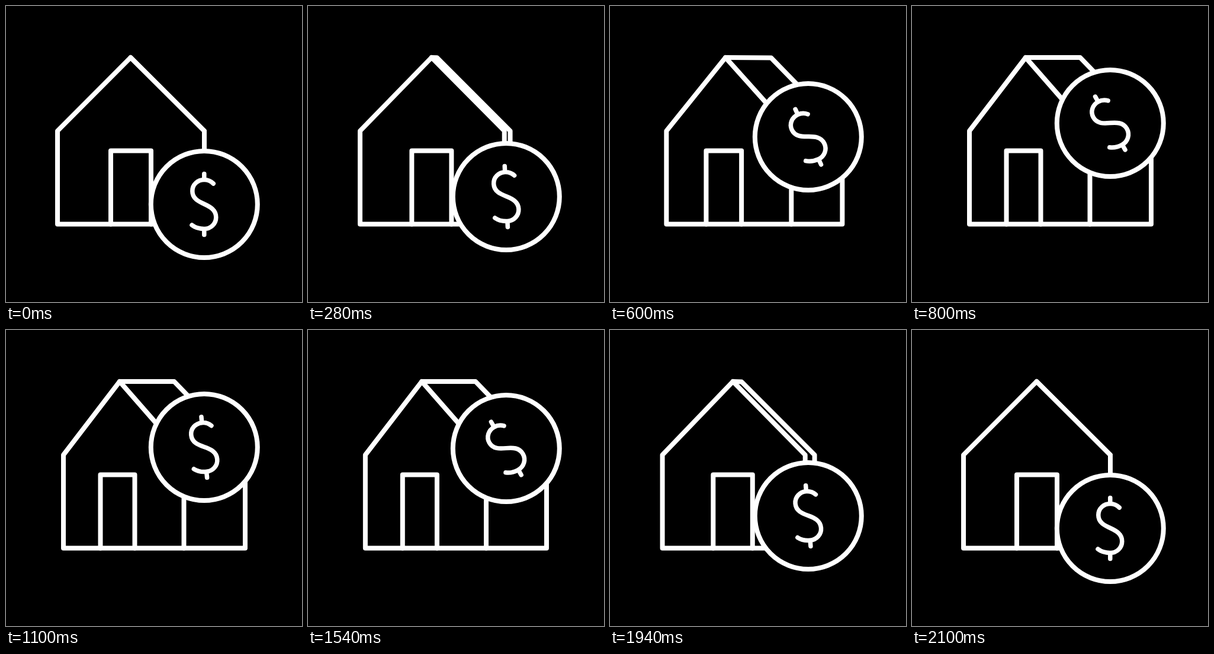
Write an HTML page that moves like this. It is 500x500 px and loops after 2.26 s.

```html
<!DOCTYPE html>
<html lang="en">
<head>
<meta charset="utf-8">
<title>House and coin</title>
<style>
  html, body { margin: 0; width: 100%; height: 100%; overflow: hidden; background: #000; }
  svg { display: block; width: 100%; height: 100%; }
</style>
</head>
<body>
<svg viewBox="0 0 500 500" fill="none" stroke="#fff" stroke-width="8" stroke-linecap="round" stroke-linejoin="round">
  <path id="side"/>
  <path id="front"/>
  <path id="door"/>
  <g id="coin">
    <circle r="90" fill="#000"/>
    <path id="dollar" stroke-width="7.5" d="M0-51.5V-43M0 43V51.5
      M15.5-35C11-39.5 6-41.5 0-41.5C-11-41.5-20-33.5-20-22.5C-20-10-10-5 0-0.5
      C10 4 20 9.5 20 22C20 33 11 41.5 0 41.5C-8 41.5-15 39.5-20.8 35"/>
  </g>
</svg>
<script>
  const LOOP = 2260, STEP = 20;
  const BASE = 368.5, EAVE = 211, RIDGE = 87;
  const el = id => document.getElementById(id);
  const mix = (a, b, k) => a + (b - a) * k;

  // Sine ease between two moments, clamped to 0..1
  function ease(t, from, to) {
    const k = Math.min(1, Math.max(0, (t - from) / (to - from)));
    return (1 - Math.cos(Math.PI * k)) / 2;
  }

  function draw(t) {
    const turn = ease(t, 160, 762) - ease(t, 1493, 2094);
    const swing = ease(t, 762, 1128) - ease(t, 1128, 1493);
    const bump = Math.sin(Math.PI * turn) ** 2;

    const left = mix(87, 97, turn);
    const apex = mix(210.5, 192, turn);
    const corner = mix(335, 300.5, turn);
    const back = mix(335, 404, turn);
    const backApex = mix(210.5, 284, turn) + 2.4 * bump;
    const doorLeft = mix(177, 159.5, turn);
    const doorRight = mix(245, 217.5, turn);

    el('side').setAttribute('d',
      `M${apex} ${RIDGE}L${backApex} ${RIDGE + 2.3 * bump}L${back} ${EAVE}V${BASE}H${corner}`);
    el('front').setAttribute('d',
      `M${left} ${EAVE}L${apex} ${RIDGE}L${corner} ${EAVE}V${BASE}H${left}Z`);
    el('door').setAttribute('d', `M${doorLeft} ${BASE}V244.5H${doorRight}V${BASE}`);
    el('coin').setAttribute('transform', `translate(334.8 ${mix(335, 198, turn)})`);
    el('dollar').setAttribute('transform', `rotate(${-30 * turn + 25 * swing})`);
  }

  const start = performance.now();
  function tick() {
    const t = (performance.now() - start) % LOOP;
    draw(Math.floor(t / STEP) * STEP);
    requestAnimationFrame(tick);
  }
  tick();
</script>
</body>
</html>
```
